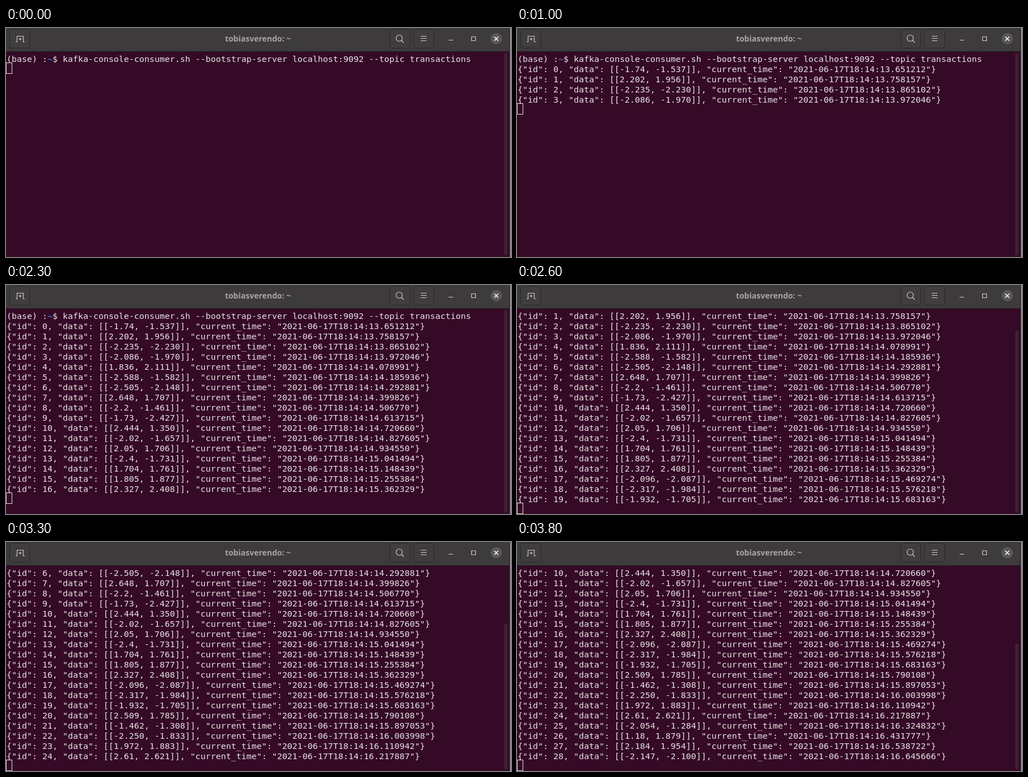
Animation, 890 px wide and 405 px high, one loop 3900 ms. Source, as an HTML page:

```html
<!DOCTYPE html>
<html lang="en">
<head>
<meta charset="utf-8">
<title>Terminal</title>
<style>
  html, body { margin: 0; width: 100%; height: 100%; overflow: hidden; background: #350a26; }
  svg { display: block; width: 890px; height: 405px; }
  .term { font: 14.95px "DejaVu Sans Mono", "Noto Sans Mono", monospace; fill: #e8e3e6; white-space: pre; }
  .path { fill: #4a72b8; font-weight: 700; }
  .title { font: 700 14px "Noto Sans", "Open Sans", sans-serif; fill: #a9a5a1; text-anchor: middle; }
  .button { fill: #3f3d3d; stroke: #292727; }
  .icon { fill: none; stroke: #d0cdca; stroke-width: 1.2; }
</style>
</head>
<body>
<svg viewBox="0 0 890 405">
  <rect width="890" height="405" fill="#350a26"/>
  <rect id="thumb" x="878" width="6" rx="3" fill="#451d37"/>
  <g id="rows" class="term">
    <text x="1" y="60">(base) :<tspan class="path">~</tspan>$ kafka-console-consumer.sh --bootstrap-server localhost:9092 --topic transactions</text>
  </g>
  <rect id="cursor" x=".5" width="10" height="19" fill="none" stroke="#e8e3e6"/>

  <rect width="888" height="42" fill="#3d3b3b"/>
  <rect y="41" width="888" height="1" fill="#242020"/>
  <rect x="887" width="1" height="405" fill="#241020"/>
  <rect x="888" width="2" height="405" fill="#8c868a"/>
  <g class="button">
    <rect x="6.5" y="2.5" width="35" height="33" rx="4"/>
    <rect x="676.5" y="2.5" width="35" height="33" rx="4"/>
    <rect x="718.5" y="2.5" width="35" height="33" rx="4"/>
  </g>
  <text class="title" x="444" y="24">tobiasverendo: ~</text>
  <circle cx="864" cy="19" r="10" fill="#595757"/>
  <g class="icon">
    <path d="M17 24.5h2.5v-10h11v10h2.5M25 17v5M22.5 19.5h5"/>
    <circle cx="693" cy="18" r="5.5"/>
    <path d="M697 22l4 4M731 14.5h10M731 18.5h10M731 22.5h10M780 21.5h8"/>
    <path d="M820.5 15.5h7v7h-7z"/>
    <path d="M860.5 15.5l7 7M867.5 15.5l-7 7" stroke="#fff" stroke-width="1.6"/>
  </g>
</svg>
<script>
const LOOP = 3900, TICK = 100, ROW = 18, LAST_ROW = 19;

// One mark per message: the sign of its pair; each ' drops a decimal
const marks = "-'+--+--+-''-'+-'+'-''+++---+--++'-+'+-".match(/[+-]'*/g);

// One message per tick, except where the stream stalls or catches up
const FIRST = 6;
const stalls = [9, 13, 20, 24, 28, 32, 37];
const doubles = [11, 22, 26];

let seed = 7;
function random() {
  seed = seed * 16807 % 2147483647;
  return seed / 2147483647;
}

// Pairs cluster around (2, 2) and (-2, -2)
function value(mark, decimals) {
  const size = 1.1 + random() + 0.7 * random();
  return (mark[0] === "-" ? "-" : "") + size.toFixed(decimals);
}

function message(mark, id) {
  const a = value(mark, 4 - mark.length), b = value(mark, 3);
  const sec = (13.651212 + id * 0.1069448).toFixed(6);
  return `{"id": ${id}, "data": [[${a}, ${b}]], "current_time": "2021-06-17T18:14:${sec}"}`;
}

const byId = id => document.getElementById(id);
const rows = byId("rows"), cursor = byId("cursor"), thumb = byId("thumb");

marks.forEach((mark, id) => {
  const text = document.createElementNS("http://www.w3.org/2000/svg", "text");
  text.setAttribute("x", 1);
  text.setAttribute("y", 60 + ROW * (id + 1));
  text.textContent = message(mark, id);
  rows.append(text);
});
const lines = [...rows.children];

function countAt(t) {
  const tick = Math.floor(t / TICK);
  const passed = list => list.filter(at => at <= tick).length;
  return Math.max(0, tick - FIRST + 1 - passed(stalls) + passed(doubles));
}

let shown = -1;
function show(count) {
  if (count === shown) return;
  shown = count;
  const hidden = Math.max(0, count + 1 - LAST_ROW);
  lines.forEach((line, i) => {
    line.style.display = i >= hidden && i <= count ? "" : "none";
  });
  rows.setAttribute("transform", `translate(0 ${-ROW * hidden})`);
  cursor.setAttribute("y", 43.5 + ROW * (count + 1 - hidden));
  const top = 44 + 358 * hidden / (hidden + 18);
  thumb.setAttribute("y", top);
  thumb.setAttribute("height", 402 - top);
}

const start = performance.now();
function frame() {
  show(countAt((performance.now() - start) % LOOP));
  requestAnimationFrame(frame);
}
frame();
</script>
</body>
</html>
```
